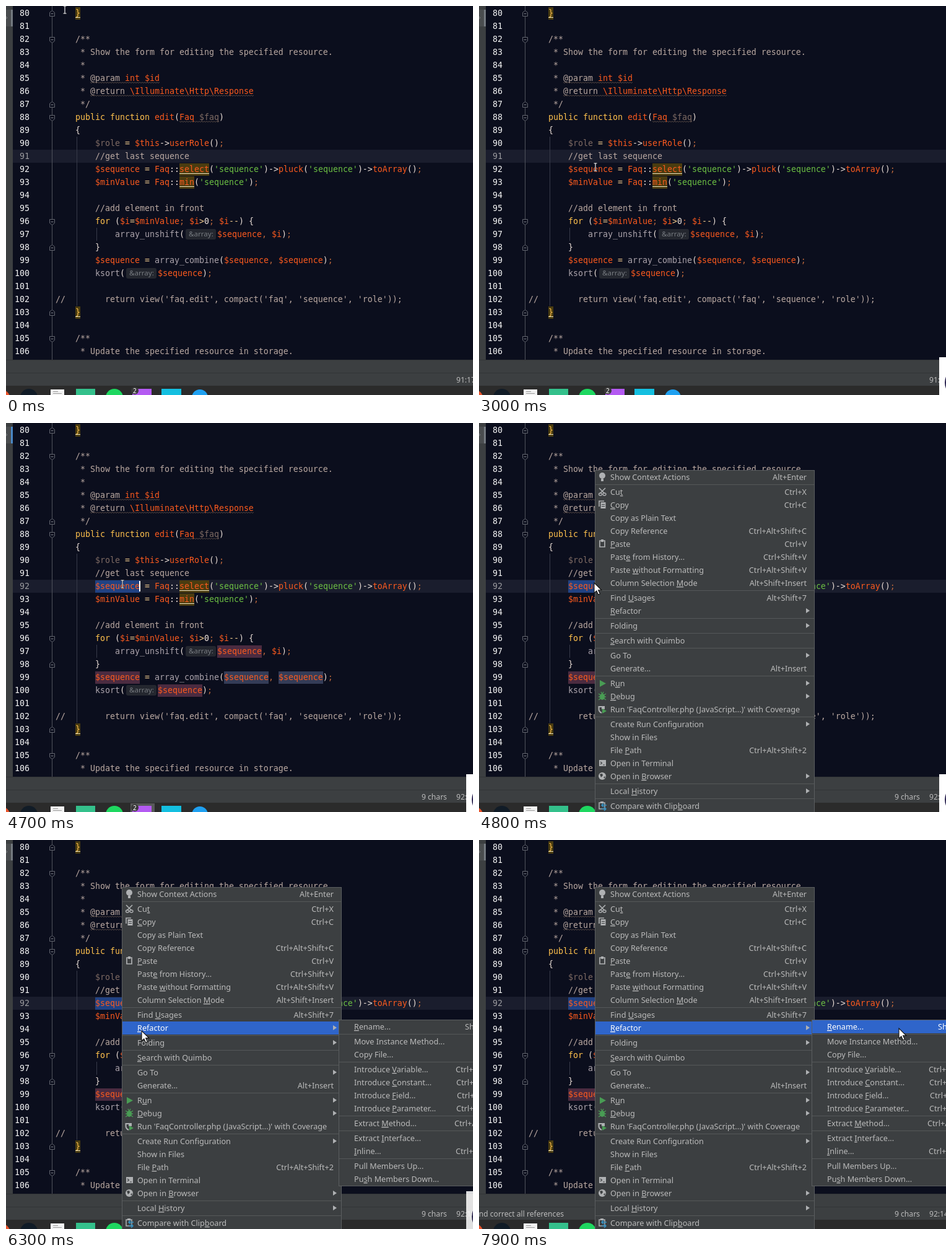
Recreate the animation shown at these times as an HTML page. Size 754 by 628 pixels, loop 8 s.

```html
<!DOCTYPE html>
<html lang="en">
<head>
<meta charset="utf-8">
<title>Editor refactoring</title>
<style>
html, body { margin: 0; width: 100%; height: 100%; overflow: hidden; background: #0b0e1d; }
svg { display: block; }
text { white-space: pre; }
.code { font: 13.29px "DejaVu Sans Mono", monospace; }
.ui { font: 12.65px "Noto Sans", sans-serif; fill: #bbb; }
.bar { font: 12.1px "Noto Sans", sans-serif; fill: #bbb; }
.hint { font: 11.6px "Noto Sans", sans-serif; fill: #777b80; }
.key { text-decoration: underline; }
.row rect { fill: none; }
.row.on rect { fill: #2f65ca; }
.row.on .ui { fill: #fff; }
</style>
</head>
<body>
<svg id="stage" width="754" height="628" viewBox="0 0 754 628" xml:space="preserve"></svg>
<script>
const LOOP = 8000;
const BG = '#0b0e1d', PANEL = '#3c3f41', GRAY = '#afb1b3', GREEN = '#499c54';
const INK = {
  c: '#b9a8a1', // comments
  k: '#ffc14d', // keywords
  v: '#fb5a1e', // variables and members
  u: '#7d6a63', // unused
  f: '#aba3ab', // plain functions
  s: '#6cbf43', // strings
  p: '#e9ddd6', // punctuation
  o: '#f2cc8f', // operators
  e: '#b8653c'  // separators
};

const esc = s => s.replace(/&/g, '&amp;').replace(/</g, '&lt;').replace(/>/g, '&gt;');
const rect = (x, y, w, h, fill, more = '') =>
  `<rect x="${x}" y="${y}" width="${w}" height="${h}" fill="${fill}" ${more}/>`;
const circle = (x, y, r, fill) => `<circle cx="${x}" cy="${y}" r="${r}" fill="${fill}"/>`;
const stroke = (d, color, w = 1) =>
  `<path d="${d}" fill="none" stroke="${color}" stroke-width="${w}"/>`;
const shape = (d, fill, more = '') => `<path d="${d}" fill="${fill}" ${more}/>`;
const text = (cls, x, y, str, more = '') =>
  `<text class="${cls}" x="${x}" y="${y}" ${more}>${esc(str)}</text>`;
const group = (id, body) => `<g id="${id}">${body}</g>`;
const mid = line => 12 + 21 * (line - 80);

// spec: ink key and text in turn, split by "|"
function code(line, col, spec, shift = 0) {
  const part = spec.split('|');
  let spans = '';
  for (let i = 0; i < part.length; i += 2)
    spans += `<tspan fill="${INK[part[i]]}">${esc(part[i + 1])}</tspan>`;
  return `<text class="code" x="${80 + 8 * col + shift}" y="${mid(line) + 4}">${spans}</text>`;
}

function wave(x1, x2, y) {
  let d = `M${x1} ${y}`;
  for (let x = x1 + 2, up = 1; x <= x2; x += 2, up = !up) d += `L${x} ${y + (up ? 1.5 : 0)}`;
  return stroke(d, '#5c4d48', 0.9);
}

// Marked name with underline
const mark = (line, x, w) => rect(x, mid(line) - 10, w, 20, '#4a3c10');
const under = (line, x, w) => rect(x, mid(line) + 6, w, 1, '#f3e6c0');

function fold(line, end) {
  const y = mid(line) + 0.5, s = end ? -1 : 1;
  return shape(`M70.5 ${y - 4 * s}h8v${6 * s}l-4 ${3 * s}l-4 ${-3 * s}z`, BG, 'stroke="#62656e"') +
    stroke(`M72.5 ${y}h4`, '#7b7e86');
}

const inlay = (line, x) => rect(x, mid(line) - 9, 49, 17, '#24272f', 'rx="3"') +
  text('hint', x + 5, mid(line) + 3, '&array:');

function editor() {
  let s = rect(0, 0, 754, 571, BG) + rect(0, 0, 11, 571, PANEL) + rect(0, 6, 8, 27, '#4a4d4f') +
    stroke('M0 17l2 2l-2 2', '#7e8184') + `<rect id="tab" x="8" y="6" width="3" height="27"/>` +
    `<rect id="row" x="11" width="743" height="21" fill="#1a1d2d"/>`;
  s += group('picked',
    rect(144, 254, 72, 20, '#214283') +
    [[341, 97], [144, 99], [245, 100]].map(([x, n]) => rect(x, mid(n) - 10, 72, 20, '#4b2b40')).join('') +
    [352, 440].map(x => rect(x, mid(99) - 10, 72, 20, '#343c57')).join(''));
  s += stroke('M74.5 0V571', '#50535c') + stroke('M114.5 211V484M146.5 358V379', '#383b49');
  for (const n of [80, 87, 98, 103]) s += fold(n, true);
  for (const n of [82, 88, 96, 105]) s += fold(n, false);
  for (let n = 80; n <= 106; n++)
    s += text('code', 38, mid(n) + 4, String(n), `id="n${n}" text-anchor="end" fill="#f4f4f4"`);
  for (const n of [80, 103]) s += mark(n, 112, 8) + code(n, 4, 'k|}') + under(n, 112, 8);
  s += mark(92, 280, 48) + mark(93, 280, 24);
  s += wave(136, 248, 123) + wave(136, 400, 144) + wave(280, 344, 186);

  s += code(82, 4, 'c|/**') +
    code(83, 5, 'c|* Show the form for editing the specified resource.') +
    code(84, 5, 'c|*') +
    code(85, 5, 'c|* @param |v|int $id') +
    code(86, 5, 'c|* @return |v|\\Illuminate\\Http\\Response') +
    code(87, 5, 'c|*/') +
    code(88, 4, 'k|public function |v|edit|p|(|v|Faq |u|$faq|p|)') +
    code(89, 4, 'p|{') +
    code(90, 8, 'u|$role|o| = |v|$this|p|->|v|userRole|p|()|e|;') +
    code(91, 8, 'c|//get last sequence') +
    code(92, 8, "v|$sequence|o| = |v|Faq|p|::|v|select|p|(|s|'sequence'|p|)->|v|pluck|p|(|s|'sequence'|p|)->|v|toArray|p|()|e|;") +
    code(93, 8, "v|$minValue|o| = |v|Faq|p|::|v|min|p|(|s|'sequence'|p|)|e|;") +
    code(95, 8, 'c|//add element in front') +
    code(96, 8, 'k|for |p|(|v|$i|o|=|v|$minValue|e|; |v|$i|o|>|p|0|e|; |v|$i|o|--|p|) {') +
    code(97, 12, 'f|array_unshift|p|(') + inlay(97, 290) +
    code(97, 0, 'v|$sequence|e|, |v|$i|p|)|e|;', 261) +
    code(98, 8, 'p|}') +
    code(99, 8, 'v|$sequence|o| = |f|array_combine|p|(|v|$sequence|e|, |v|$sequence|p|)|e|;') +
    code(100, 8, 'f|ksort|p|(') + inlay(100, 194) +
    code(100, 0, 'v|$sequence|p|)|e|;', 165) +
    code(102, 0, "c|//        return view('faq.edit', compact('faq', 'sequence', 'role'));") +
    code(105, 4, 'c|/**') +
    code(106, 5, 'c|* Update the specified resource in storage.');
  return s + under(92, 280, 48) + under(93, 280, 24) +
    rect(215, 255, 2, 17, '#fff', 'id="caret"');
}

function bottom() {
  return rect(0, 571, 754, 42, PANEL) + rect(0, 571, 754, 1, '#323436') +
    rect(0, 592, 754, 1, '#323436') + rect(0, 613, 754, 15, '#2b2b2b') +
    text('bar', 17, 608, 'Find usages of the symbol at caret', 'id="tipFind" text-anchor="end"') +
    text('bar', 137, 608, 'Rename the selected symbol and correct all references', 'id="tipRename" text-anchor="end"') +
    text('bar', 671, 608, '9 chars', 'id="chars"') +
    text('bar', 727, 608, '', 'id="pos"') +
    rect(201, 614, 39, 14, '#58595a', 'id="task"') +
    circle(-6, 632, 12, '#e8542c') + circle(37, 632, 14, '#111c27') +
    rect(72, 619, 22, 9, '#f2f2f2') + stroke('M76 622.5h8M76 625.5h14', '#9a9a9a') +
    rect(113, 618, 31, 10, '#34c08b') + circle(175, 632, 14, '#1ed760') +
    rect(204, 618, 31, 10, '#b45af2') + circle(208, 621, 6, '#3a3a3a') +
    text('bar', 205, 625, '2', 'style="font-size:10px;fill:#fff"') +
    rect(251, 618, 32, 10, '#14bfe0') + circle(313, 632, 13, '#1fa0f0') +
    group('toast', rect(743, 567, 11, 61, '#fff') + circle(776, 608, 24, '#2a2350'));
}

// An underscore marks the access key; null is a separator.
function menu(id, x, y, w, h, items) {
  let s = rect(x + 0.5, y + 0.5, w - 1, h, PANEL, 'stroke="#5b5e60"'), cy = y + 11;
  for (const item of items) {
    if (!item) {
      s += rect(x + 1, cy - 9, w - 2, 1, '#555859');
      cy += 3;
      continue;
    }
    const [label, keys, kx] = item, [a, b] = label.split('_');
    const body = b ? `${esc(a)}<tspan class="key">${b[0]}</tspan>${esc(b.slice(1))}` : esc(a);
    s += `<g class="row" data-name="${label.replace('_', '')}">` +
      rect(x + 1, cy - 10, w - 2, 21, '') +
      `<text class="ui" x="${x + 25}" y="${cy + 5}">${body}</text>`;
    if (keys === '>') s += shape(`M528 ${cy - 4}l6 4l-6 4z`, GRAY);
    else if (keys) s += text('ui', kx || 529, cy + 5, keys, kx ? '' : 'text-anchor="end"');
    s += '</g>';
    cy += 21;
  }
  return group(id, s);
}

const MAIN = [
  ['Show Context Actions', 'Alt+Enter'], null,
  ['Cu_t', 'Ctrl+X'], ['_Copy', 'Ctrl+C'], ['Copy as Plain Text'],
  ['Copy Reference', 'Ctrl+Alt+Shift+C'], ['_Paste', 'Ctrl+V'],
  ['Past_e from History...', 'Ctrl+Shift+V'],
  ['Paste _without Formatting', 'Ctrl+Alt+Shift+V'],
  ['Column Selection _Mode', 'Alt+Shift+Insert'], null,
  ['Find _Usages', 'Alt+Shift+7'], ['_Refactor', '>'], null,
  ['Folding', '>'], null, ['_Search with Quimbo'], null,
  ['Go To', '>'], ['Generate...', 'Alt+Insert'], null,
  ['R_un', '>'], ['_Debug', '>'], ["Run 'FaqController.php (JavaScript...)' with Coverage"], null,
  ['Create Run Configuration', '>'], ['Show in Files'], ['File _Path', 'Ctrl+Alt+Shift+2'],
  ['Open in Terminal'], ['Open in _Browser', '>'], null,
  ['Local _History', '>'], null, ['Compare with Clip_board']
];
const SUB = [
  ['_Rename...', 'Shift+F6', 741], null,
  ['Move Instance Method...'], ['Copy File...'], null,
  ['Introduce _Variable...', 'Ctrl+Alt+V', 726], ['Introduce _Constant...', 'Ctrl+Alt+C', 727],
  ['Introduce _Field...', 'Ctrl+Alt+F', 728], ['Introduce _Parameter...', 'Ctrl+Alt+P', 727], null,
  ['Extract _Method...', 'Ctrl+Alt+M', 724], null,
  ['Extract _Interface...'], ['_Inline...', 'Ctrl+Alt+N', 726], null,
  ['Pull Members Up...'], ['Pu_sh Members Down...']
];

function icons() {
  return circle(199, 85, 5, GRAY) + rect(197, 90, 4, 4, GRAY) +
    // scissors
    stroke('M194 105l9 9M204 105l-9 9', GRAY, 1.6) +
    stroke('M196 115m-2.5 0a2.5 2 0 1 0 5 0a2.5 2 0 1 0 -5 0M202 115m-2 0a2.5 2 0 1 0 5 0a2.5 2 0 1 0 -5 0', GRAY, 1.3) +
    // copy and paste
    stroke('M194 135v-9h8', GRAY, 1.6) + rect(196.5, 128, 8, 10, GRAY) +
    stroke('M198 131.5h5M198 134.5h5', PANEL) +
    stroke('M195 190h8v10h-8z', GRAY, 1.7) + rect(197, 188, 4, 4, GRAY) +
    // run, debug, coverage
    shape('M195 415l10 5.5l-10 5.5z', GREEN) +
    shape('M199 437a4 5 0 0 1 0 10a4 5 0 0 1 0 -10z', GREEN) +
    stroke('M193 437l3 2h6l3 -2M193 442h12M193 447l3 -2h6l3 2M197 434l1.5 3M201 434l-1.5 3', GREEN, 1.3) +
    stroke('M198 458h-4.500v4q0 4 4.500 6', GRAY, 2) + shape('M198 457h5v5h-5z', GRAY) +
    shape('M199 461l7 4l-7 4z', GREEN) +
    // terminal, globe, compare
    rect(194, 544, 11, 10, GRAY) + stroke('M196 547l2.500 2l-2.500 2M200 552h3', PANEL, 1.2) +
    circle(199, 570, 6, GRAY) + shape('M195 567l4 -1l1 3l-3 3zM201 572l3 -2l-1 4z', PANEL) +
    stroke('M194 613h9v10h-9z', GRAY, 1.5) + rect(196, 611, 5, 3, GRAY) +
    stroke('M206 617h-8m3 -3l-3 3l3 3M198 623h7m-3 -3l3 3l-3 3', '#3592c4', 1.5);
}

const beam = 'M-2.500 -6h2l.5 .5l.5 -.5h2M0 -5.500V5.500M-2.500 6h2l.5 -.5l.5 .5h2';
const stage = document.getElementById('stage');
stage.innerHTML = editor() + bottom() +
  group('popup', menu('main', 187, 76, 355, 570, MAIN) + icons()) +
  menu('sub', 537, 290, 260, 268, SUB) +
  group('beam', stroke(beam, '#10131f', 2.4) + stroke(beam, '#fff', 1.1)) +
  group('arrow', shape('M0 0V16.500l3.800 -3.600l2.800 6.200l2.700 -1.200l-2.700 -6.100h5.200z', '#fff', 'stroke="#111" stroke-width="1.1"'));

const $ = id => document.getElementById(id);
const show = (id, on) => $(id).style.display = on ? '' : 'none';
const rows = [...document.querySelectorAll('.row')];

// Steps: time, x, y
const PATH = [
  [300, 95, 6], [500, 112, 50], [800, 170, 190], [1000, 190, 242], [1200, 193, 250],
  [1300, 192, 254], [1500, 192, 254], [1800, 191, 258], [2900, 191, 258], [3000, 188, 260],
  [4700, 188, 260], [4800, 186, 258], [5200, 187, 259], [5400, 192, 264], [5700, 199, 272],
  [6000, 204, 282], [6300, 219, 308], [6400, 240, 308], [6500, 320, 306], [6700, 540, 307],
  [6800, 620, 309], [6900, 651, 311], [7000, 656, 310], [7200, 674, 308], [7300, 674, 308],
  [7900, 678, 304]
];
const TOAST = [[300, 0], [1100, 1], [5800, 1], [6300, 0.85], [7800, 0]];
const TASK = [[3600, 0], [3900, 1]];

function at(steps, t, i = 1) {
  const n = steps.findIndex(s => s[0] > t);
  if (n < 0) return steps[steps.length - 1][i];
  if (n === 0) return steps[0][i];
  const a = steps[n - 1], b = steps[n];
  return a[i] + (b[i] - a[i]) * (t - a[0]) / (b[0] - a[0]);
}

function draw(t) {
  const x = at(PATH, t, 1), y = at(PATH, t, 2);
  const clicked = t >= 3700, open = t >= 4800, line = clicked ? 92 : 91;
  const renaming = t >= 6700, refactor = t >= 6200;
  const finding = t >= 5700 && !refactor;

  $('row').setAttribute('y', mid(line) - 11 + (line === 91 ? 0 : 0));
  for (const n of [91, 92]) $('n' + n).setAttribute('fill', n === line ? '#9a9a9e' : '#f4f4f4');
  $('tab').setAttribute('fill', clicked && !open ? '#4a88c7' : '#747a80');
  show('picked', t >= 3800);
  show('caret', clicked && !open && !(t >= 4300 && t < 4700));
  show('chars', t >= 4100);
  $('pos').textContent = clicked ? '92:14' : '91:17';
  $('toast').style.opacity = at(TOAST, t);
  $('task').style.opacity = at(TASK, t);

  show('popup', open);
  show('sub', t >= 6300);
  show('tipFind', finding);
  show('tipRename', renaming);
  const active = {
    'Column Selection Mode': t >= 5300 && t < 5700,
    'Find Usages': finding,
    'Refactor': refactor,
    'Rename...': renaming
  };
  for (const r of rows) r.classList.toggle('on', !!active[r.dataset.name]);

  show('beam', !open);
  show('arrow', open);
  $(open ? 'arrow' : 'beam').setAttribute('transform', `translate(${Math.round(x)} ${Math.round(y)})`);
}

const start = performance.now();
function tick() {
  const t = (performance.now() - start) % LOOP;
  draw(Math.floor(t / 100) * 100);
  requestAnimationFrame(tick);
}
tick();
</script>
</body>
</html>
```
